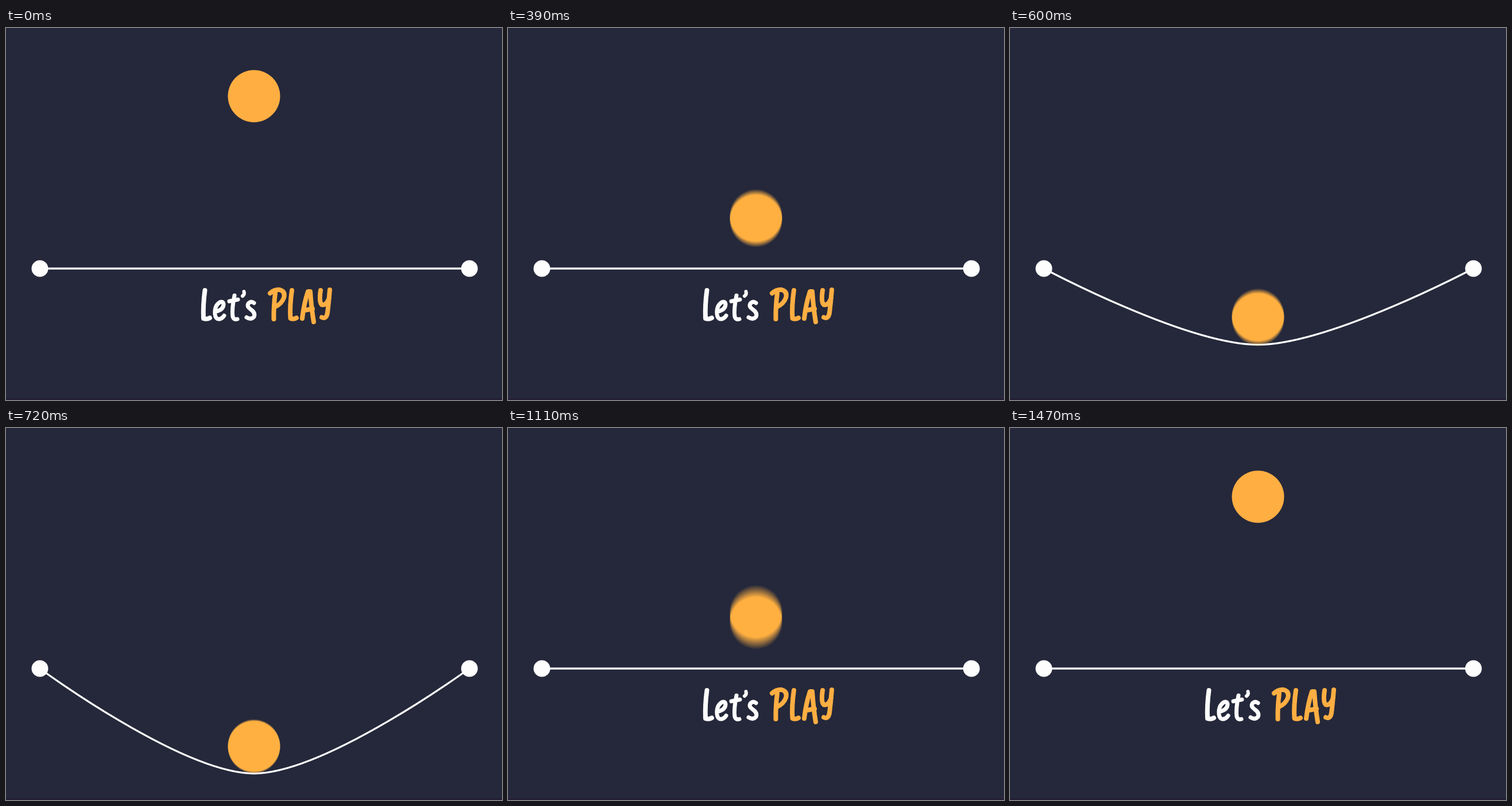
Animation, 864 px wide and 648 px high, one loop 1500 ms. Source, as an HTML page with a canvas:

```html
<!DOCTYPE html>
<html lang="en">
<head>
<meta charset="utf-8">
<title>Let's PLAY</title>
<style>
  html, body { margin: 0; width: 100%; height: 100%; overflow: hidden; background: #25283a; }
  canvas { display: block; }
</style>
</head>
<body>
<canvas id="stage" width="864" height="648" role="img" aria-label="Let's PLAY"></canvas>
<script>
const W = 864, H = 648, LOOP = 1500, STEP = 30;
const BG = '#25283a', WHITE = '#fdfdfe', ORANGE = '#ffae42';
const MID = 432, REST = 419, LEFT = 59, RIGHT = 807, RADIUS = 45.5;

const ctx = document.getElementById('stage').getContext('2d');
const layer = document.createElement('canvas');
layer.width = W;
layer.height = H;
const blur = layer.getContext('2d');

// Knots: [time in ms, y, velocity in px/ms]
const ballKnots = [
  [0, 118.7, 0], [240, 222.5, .68], [510, 428.5, .85], [570, 481, .84],
  [720, 554.5, .25], [750, 558, 0], [990, 466, -.85], [1110, 329.5, -1.55],
  [1230, 171.5, -.6], [1470, 119.7, -.06], [LOOP, 118.7, 0]
];
const stringKnots = [
  [0, REST, 0], [435, REST, 0], [435, REST, .3], [510, 468, .95], [570, 529, .85],
  [720, 601.8, .25], [750, 606.3, 0], [990, 517.5, -.85], [1092, REST, -.9],
  [1092, REST, 0], [LOOP, REST, 0]
];

// Cubic Hermite interpolation between knots
function sample(knots, t) {
  const i = knots.findIndex(k => k[0] > t);
  const [t0, y0, v0] = knots[i - 1], [t1, y1, v1] = knots[i];
  const h = t1 - t0, s = (t - t0) / h, r = 1 - s;
  return y0 * (1 + 2 * s) * r * r + y1 * s * s * (3 - 2 * s)
    + h * s * r * (v0 * r - v1 * s);
}

const lettering = [
  [WHITE, 8, 'M346.5 457Q343 482 344 506Q350 508 355 505'],
  [WHITE, 7, 'M365 494Q379 491 379 481Q378 475 372 478Q363 484 364 498Q365 508 372 507Q377 506 380 501'],
  [WHITE, 7, 'M398 466Q393 490 395 503Q397 509 403 507M389 476L404 473'],
  [WHITE, 6, 'M414.5 459Q416 464 412 467'],
  [WHITE, 7, 'M432 479Q427 475 422 480Q419 485 426 490Q435 496 432 503Q427 509 419 504'],
  [ORANGE, 8, 'M469 462Q466 486 466.5 507M460 462Q468 455 477 456Q487 459 484 470Q480 481 468 486'],
  [ORANGE, 8, 'M498 457Q494 484 495.5 506Q501 508 506 505'],
  [ORANGE, 8, 'M516 506Q519 480 526 459L530 459Q532 488 536 512M519 492L534 489'],
  [ORANGE, 8, 'M548 457Q545 477 550 482Q558 484 563 470M564 456Q562 479 560 496Q558 508 550 504']
].map(([color, width, d]) => ({ color, width, path: new Path2D(d) }));

function traceString(y) {
  const reach = 125;
  ctx.beginPath();
  ctx.moveTo(LEFT, REST);
  ctx.bezierCurveTo(LEFT, REST, MID - reach, y, MID, y);
  ctx.bezierCurveTo(MID + reach, y, RIGHT, REST, RIGHT, REST);
}

function drawLettering(y) {
  ctx.save();
  traceString(y);
  ctx.lineTo(W, H);
  ctx.lineTo(0, H);
  ctx.closePath();
  ctx.clip();
  ctx.lineCap = ctx.lineJoin = 'round';
  for (const { color, width, path } of lettering) {
    ctx.strokeStyle = color;
    ctx.lineWidth = width;
    ctx.stroke(path);
  }
  ctx.restore();
}

function dot(c, x, y, r, color) {
  c.fillStyle = color;
  c.beginPath();
  c.arc(x, y, r, 0, 2 * Math.PI);
  c.fill();
}

function drawBall(t) {
  const y = sample(ballKnots, t);
  const a = Math.max(0, t - 1), b = Math.min(LOOP - 1, t + 1);
  const speed = Math.abs(sample(ballKnots, b) - sample(ballKnots, a)) / (b - a);
  const spread = 6.5 * speed;
  if (spread < .5) return dot(ctx, MID, y, RADIUS, ORANGE);

  // Average evenly spaced copies for vertical motion blur
  const copies = 16;
  blur.clearRect(0, 0, W, H);
  blur.globalCompositeOperation = 'lighter';
  blur.globalAlpha = 1 / copies;
  for (let i = 0; i < copies; i++) {
    dot(blur, MID, y + spread * (2 * i / (copies - 1) - 1), RADIUS, ORANGE);
  }
  ctx.drawImage(layer, 0, 0);
}

function draw(t) {
  const y = sample(stringKnots, t);
  ctx.fillStyle = BG;
  ctx.fillRect(0, 0, W, H);
  ctx.fillStyle = '#231f36';
  ctx.fillRect(0, 645, W, 3);
  drawLettering(y);
  traceString(y);
  ctx.strokeStyle = WHITE;
  ctx.lineWidth = 3.3;
  ctx.stroke();
  dot(ctx, LEFT, REST, 14.5, WHITE);
  dot(ctx, RIGHT + .3, REST, 14.5, WHITE);
  drawBall(t);
}

const start = performance.now();

function tick() {
  const step = Math.floor((performance.now() - start) % LOOP / STEP);
  draw(step === 1 ? 0 : step * STEP); // the top pose holds for two steps
  requestAnimationFrame(tick);
}
tick();
</script>
</body>
</html>
```
